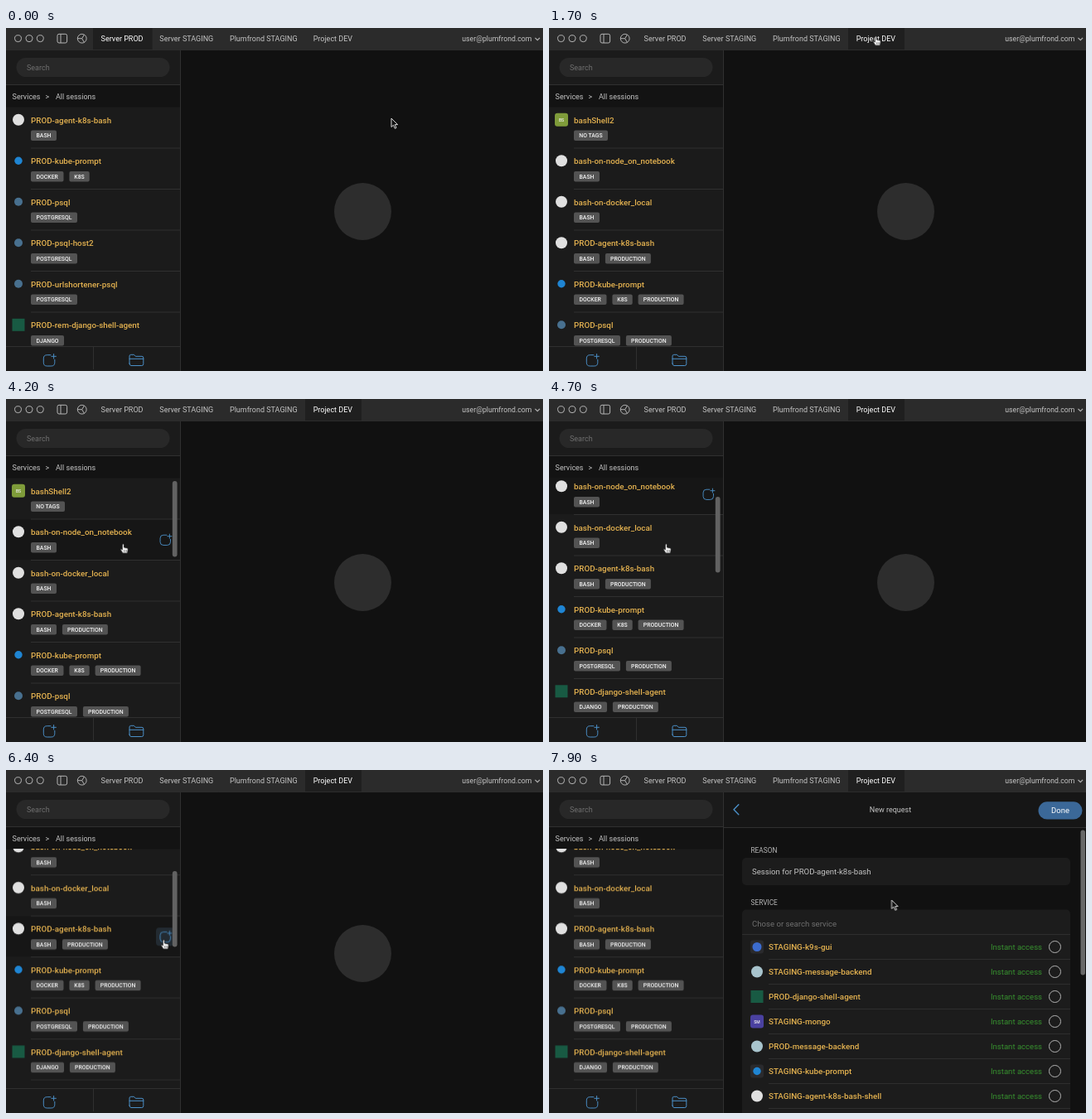
An HTML page that plays this animation: 648 by 414 pixels, repeating every 8000 ms.

```html
<!DOCTYPE html>
<html lang="en">
<head>
<meta charset="utf-8">
<title>Sessions</title>
<style>
html, body { margin: 0; width: 100%; height: 100%; overflow: hidden; background: #111; }
svg { display: block; width: 648px; height: 414px; }
text { font: 9px Roboto, "Open Sans", sans-serif; fill: #c4c4c4; }
.name { font-size: 9.8px; font-weight: 500; fill: #e4b250; }
.tag { font-size: 6.9px; font-weight: 500; fill: #f2f2f2; text-anchor: middle; }
.mid { text-anchor: middle; }
.field { font-size: 9.6px; }
.dim { fill: #6f6f6f; }
.label { font-size: 8.3px; fill: #b8b8b8; }
.ok { font-size: 9.55px; fill: #37912f; }
.on { fill: #fff; }
.line { stroke: #303030; fill: none; }
.blue { stroke: #4b8fc7; fill: none; stroke-linecap: round; stroke-linejoin: round; }
.ui { stroke: #b4b4b4; fill: none; }

/* one shared 8 s clock, held in 100 ms steps */
.a { animation: 8s step-end -10ms infinite; }
.prod { animation-name: prod; }
.dev { animation-name: dev; }
.scroll { animation-name: scroll; }
.thumb { animation-name: thumb; }
.bar { animation-name: bar; }
.hover1 { animation-name: hover1; }
.hover3 { animation-name: hover3; }
.press { animation-name: press; }
.panel { animation-name: panel; }
.panelbar { animation-name: panelbar; }
.cursor { animation-name: move; }
.hand { animation-name: hand; }
.arrow { animation-name: arrow; }

@keyframes prod { 0% { opacity: 1 } 21.25%, 100% { opacity: 0 } }
@keyframes dev { 0% { opacity: 0 } 21.25%, 100% { opacity: 1 } }
@keyframes scroll {
  0% { transform: translateY(0) }
  57.5% { transform: translateY(-14.5px) }
  58.75% { transform: translateY(-55px) }
  60% { transform: translateY(-64.5px) }
  61.25%, 100% { transform: translateY(-67.8px) }
}
@keyframes thumb {
  0% { transform: translateY(0) }
  57.5% { transform: translateY(5px) }
  58.75% { transform: translateY(19px) }
  60% { transform: translateY(22px) }
  61.25%, 100% { transform: translateY(23px) }
}
@keyframes bar { 0% { opacity: 0 } 51.25% { opacity: 1 } 88.75%, 100% { opacity: 0 } }
@keyframes hover1 { 0% { opacity: 0 } 52.5% { opacity: 1 } 62.5%, 100% { opacity: 0 } }
@keyframes hover3 { 0% { opacity: 0 } 62.5% { opacity: 1 } 88.75%, 100% { opacity: 0 } }
@keyframes press { 0% { opacity: 0 } 66.25% { opacity: 1 } 88.75%, 100% { opacity: 0 } }
@keyframes panel { 0% { opacity: 0 } 85% { opacity: .5 } 86.25%, 100% { opacity: 1 } }
@keyframes panelbar { 0% { opacity: 0 } 90%, 100% { opacity: 1 } }
@keyframes move {
  0% { transform: translate(465px, 109px) }
  3.75% { transform: translate(465px, 109px); animation-timing-function: steps(6, end) }
  11.25% { transform: translate(394px, 8px) }
  13.75% { transform: translate(394px, 9px) }
  16.25% { transform: translate(394px, 10px) }
  47.5% { transform: translate(394px, 10px); animation-timing-function: steps(4, end) }
  52.5% { transform: translate(141px, 175px) }
  61.25% { transform: translate(141px, 175px); animation-timing-function: steps(5, end) }
  67.5% { transform: translate(190px, 203px) }
  72.5% { transform: translate(190px, 205px) }
  87.5% { transform: translate(190px, 205px); animation-timing-function: steps(6, end) }
  95%, 100% { transform: translate(413.5px, 157px) }
}
@keyframes hand { 0% { opacity: 0 } 13.75% { opacity: 1 } 48.75% { opacity: 0 } 51.25% { opacity: 1 } 88.75%, 100% { opacity: 0 } }
@keyframes arrow { 0% { opacity: 1 } 13.75% { opacity: 0 } 48.75% { opacity: 1 } 51.25% { opacity: 0 } 88.75%, 100% { opacity: 1 } }
</style>
</head>
<body>
<svg id="stage" viewBox="0 0 648 414"></svg>
<script>
const rect = (x, y, w, h, fill, r = 0) =>
  `<rect x="${x}" y="${y}" width="${w}" height="${h}" rx="${r}" fill="${fill}"/>`;
const dot = (x, y, r, fill) => `<circle cx="${x}" cy="${y}" r="${r}" fill="${fill}"/>`;
const ring = (x, y, r) => `<circle class="ui" cx="${x}" cy="${y}" r="${r}"/>`;
const text = (x, y, s, cls = "") => `<text x="${x}" y="${y}" class="${cls}">${s}</text>`;
const path = (d, cls, w = 1) => `<path d="${d}" class="${cls}" stroke-width="${w}"/>`;
const group = (cls, ...parts) => `<g class="${cls}">${parts.join("")}</g>`;
const at = (x, y, s, k = 1) => `<g transform="translate(${x} ${y}) scale(${k})">${s}</g>`;

const initials = (s, fill) => (x, y) => rect(x - 8, y - 8, 16, 16, fill, 3) +
  `<text x="${x}" y="${y + 2}" class="tag" style="font-size:5px">${s}</text>`;
const icons = {
  bash: (x, y) => dot(x, y, 7, "#e0e0e0"),
  docker: (x, y) => dot(x, y, 4.7, "#1f85d3"),
  psql: (x, y) => dot(x, y, 5, "#48708f"),
  django: (x, y) => rect(x - 7.5, y - 7.5, 15, 15, "#185a43"),
  kube: (x, y) => dot(x, y, 5.5, "#3c6cd0"),
  message: (x, y) => dot(x, y, 7, "#a8c4cd"),
  bs: initials("BS", "#7f9c3a"),
  sm: initials("SM", "#4a41a0")
};

const plus = path("M1.5 -6.3H-2.8Q-7 -6.3 -7 -2.1V2.8Q-7 7 -2.8 7H2.3Q6.5 7 6.5 2.8V-.7M5.3 -7.5V-2M2.5 -4.7H8.1", "blue");

const pitch = 49.5, top0 = 95.5;
const tagWidth = { BASH: 31, DOCKER: 39.5, K8S: 24.3, POSTGRESQL: 56, PRODUCTION: 55, "NO TAGS": 41, DJANGO: 40 };

function tags(list, y) {
  let x = 30;
  return list.map(s => {
    const w = tagWidth[s];
    const out = rect(x, y, w, 12.5, "#535353", 2) + text(x + w / 2, y + 8.8, s, "tag");
    x += w + 6.9;
    return out;
  }).join("");
}

function row([icon, name, ...list], i) {
  const y = top0 + i * pitch;
  return icons[icon](15, y + 15.3) + text(30, y + 19, name, "name") + tags(list, y + 28) +
    path(`M30 ${y + pitch}H210`, "line");
}

function hover(i, extra = "") {
  const y = top0 + i * pitch;
  return group("a hover" + i, rect(0, y + .5, 210, pitch - 1, "#161616"), extra,
    at(192.5, y + 25, plus, .92));
}

const prodRows = [
  ["bash", "PROD-agent-k8s-bash", "BASH"],
  ["docker", "PROD-kube-prompt", "DOCKER", "K8S"],
  ["psql", "PROD-psql", "POSTGRESQL"],
  ["psql", "PROD-psql-host2", "POSTGRESQL"],
  ["psql", "PROD-urlshortener-psql", "POSTGRESQL"],
  ["django", "PROD-rem-django-shell-agent", "DJANGO"]
];
const devRows = [
  ["bs", "bashShell2", "NO TAGS"],
  ["bash", "bash-on-node_on_notebook", "BASH"],
  ["bash", "bash-on-docker_local", "BASH"],
  ["bash", "PROD-agent-k8s-bash", "BASH", "PRODUCTION"],
  ["docker", "PROD-kube-prompt", "DOCKER", "K8S", "PRODUCTION"],
  ["psql", "PROD-psql", "POSTGRESQL", "PRODUCTION"],
  ["django", "PROD-django-shell-agent", "DJANGO", "PRODUCTION"]
];
const services = [
  ["kube", "STAGING-k9s-gui"],
  ["message", "STAGING-message-backend"],
  ["django", "PROD-django-shell-agent"],
  ["sm", "STAGING-mongo"],
  ["message", "PROD-message-backend"],
  ["docker", "STAGING-kube-prompt"],
  ["bash", "STAGING-agent-k8s-bash-shell"]
];

const header = [
  rect(0, 0, 648, 26.5, "#2b2b2b"),
  [14.5, 28, 41.3].map(x => ring(x, 12.7, 4)).join(""),
  path("M64 7.3H71.6Q73.6 7.3 73.6 9.3V16Q73.6 18 71.6 18H64Q62 18 62 16V9.3Q62 7.3 64 7.3ZM66 7.3V18", "ui"),
  ring(91.7, 12.7, 5.4),
  path("M91.7 12.7H86.3M91.7 12.7L94.4 8M91.7 12.7L94.4 17.4", "ui"),
  text(114.6, 16.2, "Server PROD"),
  text(185.3, 16.2, "Server STAGING"),
  text(270, 16.2, "Plumfrond STAGING"),
  text(370.7, 16.2, "Project DEV"),
  group("a prod", rect(105, 0, 71.5, 26.5, "#1f1f1f"), text(114.6, 16.2, "Server PROD", "on")),
  group("a dev", rect(361, 0, 68, 26.5, "#1f1f1f"), text(370.7, 16.2, "Project DEV", "on")),
  `<text x="634.3" y="16.2" style="font-size:8.7px;text-anchor:end">user@plumfrond.com</text>`,
  path("M638.5 11.8L641.3 14.6L644.1 11.8", "ui", 1.2),
  path("M0 26.5H648", "line", .8)
];

const press = group("a press", rect(181, top0 + 3 * pitch + 14, 22, 22, "#232b32", 4));

const sidebar = [
  rect(0, 27, 210, 387, "#1b1b1b"),
  rect(12.5, 36, 185, 23, "#282828", 11.5),
  text(25, 50.7, "Search", "dim"),
  rect(0, 69, 210, 26.5, "#131313"),
  path("M0 68.5H210", "line"),
  text(7.6, 85.8, "Services"), text(47.6, 85.8, "&gt;"), text(60, 85.8, "All sessions"),
  `<g clip-path="url(#list)">`,
  group("a prod", ...prodRows.map(row)),
  group("a dev", group("a scroll", hover(1), hover(3, press), ...devRows.map(row))),
  group("a bar", group("a thumb", rect(200.8, 99, 5.8, 91.5, "#626262", 2.9))),
  "</g>",
  path("M0 384.5H210M105.5 384.5V412M210.5 27V414", "line"),
  at(52.3, 401, plus),
  path("M149 405V396Q149 394.3 150.7 394.3H154.5L156.3 396.3H164Q165.8 396.3 165.8 398V405.5Q165.8 407.5 163.8 407.5H151Q149 407.5 149 405ZM149 399.3H165.8", "blue")
];

function service([icon, name], i) {
  const y = 213.5 + i * 30;
  const tile = icon === "kube" || icon === "docker" ? rect(243, y - 8, 16, 16, "#2a2a2d", 3) : "";
  return tile + icons[icon](251, y) + text(265, y + 3.6, name, "name") +
    text(533, y + 3.4, "Instant access", "ok") + ring(610.5, y, 7) +
    path(`M265 ${y + 15}H629`, "line", .9);
}

const panel = group("a panel",
  rect(211, 27, 437, 387, "#111"),
  rect(211, 27, 437, 42, "#161616"),
  path("M211 69.5H648", "line"),
  path("M228.8 41.8L223 47.8L228.8 53.8", "blue", 1.4),
  text(412, 51, "New request", "mid"),
  rect(590.5, 38.3, 53, 21.2, "#3b6898", 10.6),
  `<text x="617" y="52.2" class="mid on" style="font-size:9.5px">Done</text>`,
  text(243.5, 99.7, "REASON", "label"),
  rect(233, 106, 396, 33, "#1c1c1c", 5),
  text(245, 125.7, "Session for PROD-agent-k8s-bash", "field"),
  text(243.5, 162.6, "SERVICE", "label"),
  rect(233, 168.5, 396, 260, "#1c1c1c", 5),
  text(245, 188.5, "Chose or search service", "field dim"),
  path("M233 198.5H629", "line", .9),
  ...services.map(service),
  group("a panelbar", rect(641.5, 72.5, 5.5, 175, "#686868", 2.7)));

const cursor = group("a cursor",
  group("a arrow", `<path d="M0 0V10.5L2.5 8.2 4.3 12.3 6 11.5 4.3 7.6H7.6Z" fill="#111" stroke="#eee" stroke-width=".9"/>`),
  group("a hand", at(.4, 0, `<path d="M-1.3 1.2a1.2 1.2 0 0 1 2.4 0V4.5l4 .8q1.2.4 1.2 1.6L5.5 12H-.5L-3.6 7.6q-.4-1.3.9-1.2L-1.3 7.6Z" fill="#f4f4f4" stroke="#111" stroke-width=".8"/><path d="M1 8V10.5M2.7 8V10.5M4.3 8V10.5" stroke="#333" stroke-width=".6"/>`, .92)));

document.getElementById("stage").innerHTML = [
  `<clipPath id="list"><rect y="95.5" width="210" height="289"/></clipPath>`,
  rect(0, 0, 648, 414, "#111"),
  dot(430.5, 221.5, 34.5, "#2d2d2d"),
  ...sidebar, panel, ...header, cursor
].join("");
</script>
</body>
</html>
```
